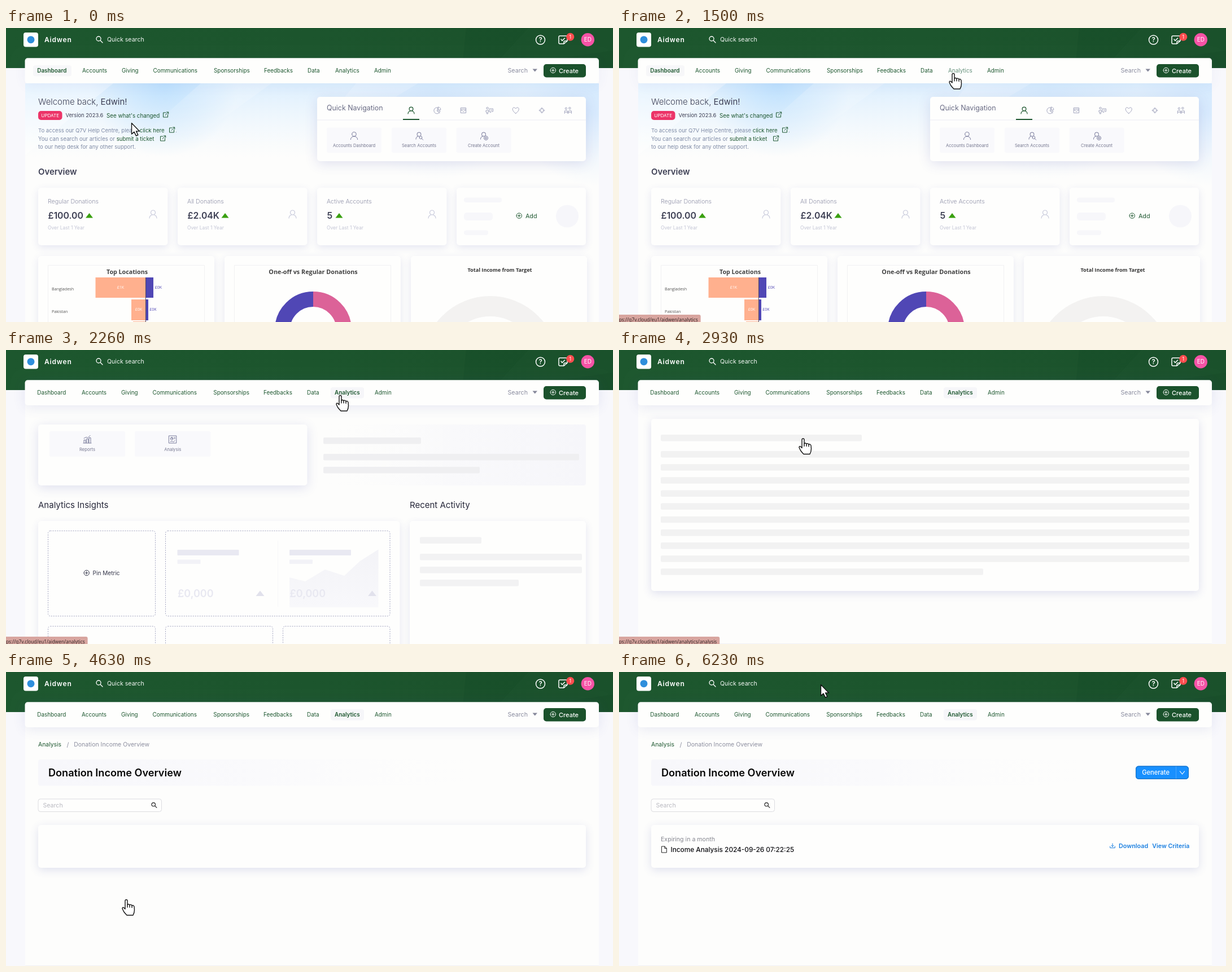
An HTML page with a canvas for the animation above (6.33 s loop, 1075 by 521 pixels).

```html
<!DOCTYPE html>
<html lang="en">
<head>
<meta charset="utf-8">
<title>Analytics walkthrough</title>
<style>
html, body { margin: 0; width: 100%; height: 100%; overflow: hidden; background: #f8f8fc; }
canvas { display: block; width: 1075px; height: 521px; }
</style>
</head>
<body>
<canvas id="stage"></canvas>
<script>
const W = 1075, H = 521, LOOP = 6330;
const canvas = document.getElementById('stage');
const ratio = window.devicePixelRatio || 1;
canvas.width = W * ratio;
canvas.height = H * ratio;
const c = canvas.getContext('2d');

const GREEN = '#1d572f', INK = '#3d3f54', MUTED = '#a3a6be', PANEL = '#fefefd', BLUE = '#1890ff';
const UI = 'Inter, sans-serif', CHART = '"Open Sans", sans-serif';
const TAU = Math.PI * 2;

// Text: y is the middle of the capitals. Returns the advance width.
function text(s, x, y, size, color, weight = 400, align = 'left', family = UI) {
  c.font = `${weight} ${size}px ${family}`;
  c.textAlign = align;
  c.fillStyle = color;
  c.fillText(s, x, y + size * 0.364);
  return c.measureText(s).width;
}
function box(x, y, x2, y2, color, r = 0) {
  c.beginPath();
  c.roundRect(x, y, x2 - x, y2 - y, r);
  c.fillStyle = color;
  c.fill();
}
function frame(x, y, x2, y2, color, r = 4, dash = []) {
  c.beginPath();
  c.roundRect(x + 0.5, y + 0.5, x2 - x - 1, y2 - y - 1, r);
  c.setLineDash(dash);
  c.strokeStyle = color;
  c.lineWidth = 1;
  c.stroke();
  c.setLineDash([]);
}
function card(x, y, x2, y2, blur = 14, alpha = 0.13, r = 5) {
  c.save();
  c.shadowColor = `rgba(70,80,170,${alpha})`;
  c.shadowBlur = blur * ratio;
  c.shadowOffsetY = 4 * ratio;
  box(x, y, x2, y2, PANEL, r);
  c.restore();
}
function disc(x, y, r, color) {
  c.beginPath();
  c.arc(x, y, r, 0, TAU);
  c.fillStyle = color;
  c.fill();
}
function poly(color, ...p) {
  c.beginPath();
  for (let i = 0; i < p.length; i += 2) c.lineTo(p[i], p[i + 1]);
  c.fillStyle = color;
  c.fill();
}
// Line icon from an SVG path, placed around its own origin.
function icon(d, x, y, color, width = 1, scale = 1) {
  c.save();
  c.translate(x, y);
  c.scale(scale, scale);
  c.strokeStyle = color;
  c.lineWidth = width / scale;
  c.lineCap = c.lineJoin = 'round';
  c.stroke(new Path2D(d));
  c.restore();
}
function gradient(x, y, x2, y2, ...colors) {
  const g = c.createLinearGradient(x, y, x2, y2);
  colors.forEach((k, i) => g.addColorStop(i / (colors.length - 1), k));
  return g;
}
function glow(x, y, r, rgb, alpha) {
  const g = c.createRadialGradient(x, y, 0, x, y, r);
  g.addColorStop(0, `rgba(${rgb},${alpha})`);
  g.addColorStop(1, `rgba(${rgb},0)`);
  box(34, 98, 1050, H, g);
}
function faded(alpha, draw) {
  if (alpha <= 0) return;
  c.save();
  c.globalAlpha = alpha;
  draw();
  c.restore();
}

const ICON = {
  person: 'M-4-3a4 4 0 1 0 8 0a4 4 0 1 0-8 0M-6.5 7C-6.5-1 6.5-1 6.5 7',
  pie: 'M1-5A5.5 5.5 0 1 0 5 1L0 1ZM2-6A5 5 0 0 1 6-1L2-1ZM0 1L4 5',
  inbox: 'M-4.5-4.5H4.5V4.5H-4.5ZM-4.5-2H4.5M-4.5 0H-2C-1 2.5 1 2.5 2 0H4.5',
  talk: 'M-5.5-4a1.7 1.7 0 1 0 3.4 0a1.7 1.7 0 1 0-3.4 0M-6 0H-2V3H-3V6H-5V3H-6ZM0-3H6V2H3L1 4V2H0ZM2-.5H4',
  heart: 'M0 5.5C-9-1-5-6-2.5-5Q-1-4.7 0-3Q1-4.7 2.5-5C5-6 9-1 0 5.5Z',
  target: 'M-3.5 0a3.5 3.5 0 1 0 7 0a3.5 3.5 0 1 0-7 0M0-5V-2M0 2V5M-5 0H-2M2 0H5',
  group: 'M-5-3.5a1.6 1.6 0 1 0 3.2 0a1.6 1.6 0 1 0-3.2 0M1.5-4a1.6 1.6 0 1 0 3.2 0a1.6 1.6 0 1 0-3.2 0M-6 5.5V1Q-3.5-2-1 1V5.5M1 5.5V1Q3-2 6 1V5.5M-6 3H6',
  lens: 'M-5-1.5a4 4 0 1 0 8 0a4 4 0 1 0-8 0M2 1.5L6 5.5',
  plus: 'M-4.7 0a4.7 4.7 0 1 0 9.4 0a4.7 4.7 0 1 0-9.4 0M-2.4 0H2.4M0-2.4V2.4',
  link: 'M0-3.5H-4.5V4.5H3.5V0M1.5-4.5H4.7V-1.3M4.5-4.3L-1 1',
  bars: 'M-6 6V1H-3V6M-1.5 6V-1H1.5V6M3 6V-3H6V6M-7 6.5H7M-6-2L-2-4L1-3L5-7',
  report: 'M-6.5-6.5H6.5V6.5H-6.5ZM-4-1.5a2.3 2.3 0 1 0 4.6 0a2.3 2.3 0 1 0-4.6 0M-1.7-3.7V-1.5H.5M2.5-3.5H4.5M2.5-1.5H4.5M-4 4L-1 3L1 4.5L4 2',
  note: 'M7-2V-5Q7-7 5-7H-6Q-8-7-8-5V5Q-8 7-6 7H1L7 2V-2M1 7V4Q1 2 3 2H7M-4-1L-2 1.5L2.5-3',
  file: 'M-4-5.5H1L4.5-2V5.5H-4ZM1-5.5V-2H4.5',
  download: 'M0-4V1.5M-2-.7L0 1.5L2-.7M-4.3 1V3.7H4.3V1',
  chevron: 'M-4-2.5L0 2.5L4-2.5'
};

// Menu entries: label, x before and after the active entry changes.
const NAV = [
  ['Dashboard', 55.3, 55.3], ['Accounts', 135, 134], ['Giving', 205, 204],
  ['Communications', 260.5, 259.5], ['Sponsorships', 368, 367.3], ['Feedbacks', 457, 456],
  ['Data', 534, 533], ['Analytics', 583, 582], ['Admin', 652, 653]
];

function shell() {
  box(0, 0, W, H, '#f8f8fc');
  box(0, 0, W, 71, gradient(0, 0, W, 0, '#1d572e', '#1c552d', '#1b512b'));
  poly('rgba(8,50,24,.1)', 815, 0, 1075, 0, 1075, 71, 808, 71);
  poly('rgba(60,120,75,.07)', 925, 0, 1075, 0, 1075, 40, 860, 71);
  box(34, 71, 1050, H, '#fdfdfc');

  box(31, 8, 57, 33.5, '#fff', 4);
  disc(44, 20.7, 6.5, '#2f8fdc');
  c.letterSpacing = '0.8px';
  text('Aidwen', 68, 20.5, 12, '#fff', 600);
  c.letterSpacing = '0px';
  icon(ICON.lens, 165, 20.5, '#fff', 1.3);
  text('Quick search', 179, 20.5, 10.6, '#f4f8f5');
  c.beginPath();
  c.arc(946.5, 21, 8, 0, TAU);
  c.strokeStyle = '#fff';
  c.lineWidth = 1.5;
  c.stroke();
  text('?', 946.5, 21, 11.5, '#fff', 600, 'center');
  icon(ICON.note, 987, 21, '#fff', 1.5);
  disc(999.3, 15.8, 7, '#ff4d4f');
  text('1', 999.3, 15.8, 8.5, '#fff', 400, 'center');
  disc(1030.3, 20.8, 11.7, '#f653a6');
  text('ED', 1030.3, 20.8, 10, '#fff', 400, 'center');
}

function navBar(t) {
  card(33.5, 53.3, 1050, 98, 22, t < 1730 ? 0.06 : 0.12, 5);
  const late = t >= 1860, active = late ? 'Analytics' : 'Dashboard';
  if (late) box(575, 66, 634, 85.5, '#f6f6f9', 4);
  else box(48, 66, 116, 85.5, t < 1730 ? '#f7f7f9' : '#fbfbfc', 4);
  for (const [label, early, moved] of NAV) {
    const hover = label === 'Analytics' && t >= 1130 && !late;
    text(label, late ? moved : early, 75.6, 9.9, hover ? '#64907a' : GREEN, label === active ? 600 : 400);
  }
  text('Search', 888.5, 75.5, 10.7, '#8a8c9f');
  poly('#85879a', 932.5, 72.5, 941, 72.5, 936.7, 77.5);
  box(952, 64, 1027, 87.5, '#1b522c', 5);
  icon(ICON.plus, 968.8, 75, '#fff');
  text('Create', 979, 75.5, 11, '#fff', 500);
}

function tile(x, y, x2, y2, label, shape, scale = 1) {
  box(x, y, x2, y2, '#f9f9fc', 3);
  icon(ICON[shape], (x + x2) / 2, y + 14.5, '#7a7c9c', 1, scale);
  text(label, (x + x2) / 2, y + 32, 7.6, '#75778f', 400, 'center');
}

function hero() {
  box(34, 98, 1050, 230, gradient(0, 98, 0, 230, 'rgba(208,233,254,.75)', 'rgba(230,243,255,0)'));
  glow(280, 98, 130, '150,206,253', 0.45);
  glow(760, 110, 160, '195,225,254', 0.35);
  glow(1040, 150, 130, '195,223,254', 0.5);
  poly(gradient(0, 98, 0, 200, 'rgba(255,255,255,.22)', 'rgba(255,255,255,0)'), 345, 98, 470, 98, 330, 200, 230, 200);
  poly('rgba(255,255,255,.18)', 620, 98, 730, 98, 690, 122, 600, 122);
  poly('rgba(255,255,255,.3)', 34, 98, 190, 98, 34, 225);
}

function stat(x, title, value, arrow) {
  card(x, 283, x + 229.5, 385);
  text(title, x + 17, 307.5, 10.6, '#8f91a8', 300);
  text(value, x + 17.5, 332.5, 15.8, INK, 600);
  poly('#3aa010', x + arrow - 6.5, 336.5, x + arrow, 328, x + arrow + 6.5, 336.5);
  text('Over Last 1 Year', x + 17, 353.5, 8.5, '#c3c5d5');
  icon(ICON.person, x + 203.5, 330, '#c9cbdc', 1.2);
}

function charts() {
  for (const x of [57, 387, 717]) card(x, 404, x + 312, 540);
  frame(74, 420, 352, 540, '#f1f1f3', 0);
  frame(404, 420, 682, 540, '#f1f1f3', 0);
  const purple = '#5047b5', peach = '#ffb08e';
  text('Top Locations', 214.5, 432, 10.7, '#414141', 700, 'center', CHART);
  text('Bangladesh', 81, 462.5, 7.2, '#555', 400, 'left', CHART);
  text('Pakistan', 81, 502.5, 7.2, '#555', 400, 'left', CHART);
  box(158.5, 442, 247, 478, peach);
  box(248, 442, 261, 478, purple);
  box(222, 481, 247, 518, peach);
  box(248, 481, 252, 518, purple);
  box(225, 520, 247, 521, peach);
  box(247, 442, 248, 521, '#4b4360');
  text('£1K', 203, 459.5, 7, '#fff', 400, 'center', CHART);
  text('£0K', 270, 459.5, 7, purple, 400, 'center', CHART);
  text('£0K', 235, 498.5, 7, '#fff', 400, 'center', CHART);
  text('£0K', 260.5, 498.5, 7, purple, 400, 'center', CHART);

  text('One-off vs Regular Donations', 544, 432, 10.8, '#414141', 700, 'center', CHART);
  const arc = (x, y, r, width, a, b, color) => {
    c.beginPath();
    c.arc(x, y, r, a, b);
    c.strokeStyle = color;
    c.lineWidth = width;
    c.stroke();
  };
  arc(544, 535, 54.5, 27, Math.PI * 0.5, Math.PI * 1.5, purple);
  arc(544, 535, 54.5, 27, -Math.PI / 2, Math.PI / 2, '#dc6298');
  text('Total Income from Target', 874.5, 429, 9.15, '#333', 700, 'center', CHART);
  arc(857.5, 595, 102, 36, Math.PI, TAU, '#f3f2f1');
}

function dashboard() {
  hero();
  const hi = text('Welcome back, ', 57, 131, 14.9, INK, 300);
  text('Edwin!', 57 + hi, 131, 14.9, INK);
  box(57, 147, 99.5, 163, '#ec3468', 5);
  text('UPDATE', 78.2, 155.2, 8.2, '#fff', 400, 'center');
  text('Version 2023.6', 105.5, 155, 9.3, INK);
  text("See what's changed", 178, 155, 9.8, GREEN);
  icon(ICON.link, 283, 153.5, GREEN);
  const grey = '#7f8ba6';
  let x = 57 + text('To access our Q7V Help Centre, please ', 57, 181.5, 9.55, grey);
  text('click here', x, 181.5, 9.6, GREEN);
  icon(ICON.link, 294, 180.5, GREEN);
  text('.', 300, 181.5, 9.5, grey);
  x = 57 + text('You can search our articles or ', 57, 196.7, 9.65, grey);
  text('submit a ticket', x, 196.7, 9.7, GREEN);
  icon(ICON.link, 278, 195.5, GREEN);
  text('to our help desk for any other support.', 57, 211, 9.5, grey);

  card(551, 122, 1027, 236, 22, 0.17);
  text('Quick Navigation', 568, 141.5, 12.4, '#696b84');
  box(551, 162.5, 1027, 163.5, '#eeeef3');
  box(703, 161, 732, 163, GREEN);
  ['person', 'pie', 'inbox', 'talk', 'heart', 'target', 'group'].forEach((name, i) =>
    icon(ICON[name], 717.5 + i * 46.3, 146, i ? MUTED : GREEN, i ? 1 : 1.2, i ? 1 : 0.85));
  tile(568, 176.5, 665, 221, 'Accounts Dashboard', 'person', 0.95);
  tile(683, 176.5, 780, 221, 'Search Accounts', 'person', 0.85);
  tile(797.5, 176.5, 894.5, 221, 'Create Account', 'person', 0.85);
  disc(735, 195, 4, '#f9f9fc');
  icon(ICON.lens, 735, 195, '#7a7c9c', 1, 0.6);
  disc(850, 195, 4, '#f9f9fc');
  icon(ICON.plus, 850, 195, '#7a7c9c', 1, 0.75);

  text('Overview', 57, 255, 14.9, INK, 600);
  stat(57, 'Regular Donations', '£100.00', 90.5);
  stat(304, 'All Donations', '£2.04K', 84);
  stat(551, 'Active Accounts', '5', 39);
  card(798, 283, 1027, 385);
  box(811, 300.5, 878, 309, '#f7f7fa', 4);
  box(811, 327, 862, 341, '#f7f7fa', 5);
  box(811, 358.5, 854, 367, '#f7f7fa', 4);
  disc(994, 333.5, 20, '#f6f6fa');
  icon(ICON.plus, 908.7, 332.7, GREEN);
  text('Add', 920, 333, 10.7, GREEN);
  charts();
}

function bars(color, rows) {
  for (const [x, x2, y] of rows) box(x, y, x2, y + 11.5, color, 2);
}

function metric(x) {
  box(x, 354, x + 109, 364, '#e9e9f2', 1);
  box(x, 371.5, x + 41, 379, '#f2f2f7', 1);
  text('£0,000', x + 0.5, 431, 18, '#e8e8f1', 600);
  poly('#e1e1ec', x + 139, 436, x + 146.5, 426.5, x + 154, 436);
}

function analytics() {
  card(57, 132, 533.5, 240, 20, 0.17);
  tile(77, 144, 211, 189, 'Reports', 'bars');
  tile(228, 144, 362.5, 189, 'Analysis', 'report');
  box(551, 132, 1027, 240, gradient(551, 0, 1027, 0, 'rgba(253,253,252,0)', '#f9f9fb', '#f6f6fa'), 4);
  bars('#efeff1', [[562, 735, 155], [562, 1015, 184], [562, 839, 207]]);
  text('Analytics Insights', 57, 275, 15, '#26273a');
  text('Recent Activity', 715, 275, 15, '#26273a');

  card(57, 303, 697.5, 540);
  card(715, 303, 1027, 540);
  bars('#f2f2f3', [[733, 842, 331.5], [733, 1020, 361], [733, 1020, 384], [733, 908, 407]]);
  const edge = '#a2a4c0', dash = [2, 2];
  frame(74, 320, 265, 472, edge, 4, dash);
  frame(282, 320, 680.5, 472, edge, 4, dash);
  for (const [x, x2] of [[74, 265], [282, 473], [490, 680.5]]) frame(x, 489, x2, 540, edge, 4, dash);
  icon(ICON.plus, 142.7, 395, '#34364a');
  text('Pin Metric', 153.5, 395.5, 10.1, '#34364a');
  box(481, 338, 482, 455, '#f6f6f9');
  poly(gradient(0, 354, 0, 456, '#f3f3f7', '#f8f8fb'),
    502, 403, 530, 410, 565, 389, 599, 400, 627, 374, 659.5, 353.5, 659.5, 456, 502, 456);
  metric(303.5);
  metric(502);
}

function pageEnd() {
  box(34, 520, 1050, 521, '#f1f1f5');
}

function skeleton() {
  card(57, 122, 1027, 427, 16, 0.17);
  const rows = [[74, 430, 150]];
  for (let i = 0; i < 9; i++) rows.push([74, 1010, 179 + i * 23.15]);
  rows.push([74, 645, 387.3]);
  bars('#f2f2f2', rows);
  pageEnd();
}

function heading(parent, slash, name, title) {
  text(parent, 57, 128.5, 10.4, GREEN);
  text('/', slash, 128.5, 11, '#8c8e9f');
  text(name, slash + 12.7, 128.5, 10.5, '#8c8e9f');
  box(57, 155, 860, 201.5, gradient(57, 0, 860, 0, '#f7f7fb', '#fafafc', 'rgba(253,253,252,0)'), 4);
  text(title, 75, 178.3, 18.1, '#050505', 600);
  pageEnd();
}

function analysis(t) {
  heading('Analytics', 112, 'Analysis', 'Analysis');
  card(57, 225, 1027, 458.5, 20, 0.17);
  box(57, 225, 1027, 265, '#fafafd', [5, 5, 0, 0]);
  text('Giving', 74, 245, 12, '#24252f', 500);
  card(73, 281, 296, 442, 16, t >= 3780 ? 0.16 : 0.04);
  frame(73, 281, 296, 442, '#85879c', 4, [2, 1.4]);
  box(91.5, 291, 278, 432, '#fbfbfc');
  for (const [x, y, r] of [[254, 322, 6], [216.5, 348.5, 8], [155.5, 360, 5.7], [126, 391, 17], [192, 373, 8], [237, 381, 12]])
    disc(x, y, r, '#ededee');
  text('Donation Income', 184.7, 312.5, 15.2, GREEN, 600, 'center');
  text('Overview', 184.7, 332.5, 15.2, GREEN, 600, 'center');
  box(91.5, 349.5, 278, 350.5, '#e6e6e9');
  ['Provides insights to the amount,', 'source and characteristics of',
    'donation income raised from single', 'and regular donations.'].forEach((line, i) =>
    text(line, 91.5, 365.5 + i * 15.75, 10.4, '#2f303a'));
}

function results(t) {
  heading('Analysis', 107.5, 'Donation Income Overview', 'Donation Income Overview');
  box(57, 225, 276, 248, PANEL, 4);
  frame(56.5, 224.5, 276, 248, '#dcdce0');
  text('Search', 65.5, 236, 10.6, '#b9b9c0');
  icon(ICON.lens, 262, 236, '#222', 1.2, 0.8);
  card(57, 271, 1027, 347, 16, 0.16);
  faded(Math.min(1, (t - 4880) / 240), () => {
    box(915, 166.5, 1009, 190, BLUE, 5);
    frame(915, 166.5, 1009, 190, '#1568b8', 5);
    box(986, 167.5, 987, 189, '#4ba7fb');
    text('Generate', 926.3, 178, 11.1, '#fff', 500);
    icon(ICON.chevron, 997.5, 178.5, '#fff', 1.2);
    text('Expiring in a month', 74, 296, 10.6, '#85868f');
    icon(ICON.file, 79.8, 314.5, '#222');
    text('Income Analysis 2024-09-26 07:22:25', 91.5, 315, 11.8, '#101014', 500);
    icon(ICON.download, 874, 308, '#1a7fe0');
    text('Download', 885, 308.2, 10.75, '#1a7fe0', 600);
    text('View Criteria', 944.3, 308.2, 10.6, '#1a7fe0', 600);
  });
}

// Link previews: path, fade-in start and end, fade-out start and end.
const PREVIEWS = [
  ['analytics', 1160, 1260, 2640, 2641],
  ['analytics/analysis', 2640, 2641, 3260, 3400],
  ['analytics/analysis/donation-income', 3950, 4050, 4230, 4400]
];
function preview(t) {
  for (const [path, a, b, d, e] of PREVIEWS) {
    const alpha = Math.min(1, (t - a) / (b - a), (e - t) / (e - d));
    faded(alpha, () => {
      const label = 'ps://q7v.cloud/eu1/aidwen/' + path;
      c.font = `400 8.3px ${CHART}`;
      box(0, 508, c.measureText(label).width + 5, H, '#d8a59f', [0, 3, 0, 0]);
      text(label, 0, 516.6, 8.3, '#2b2020', 400, 'left', CHART);
    });
  }
}

const ARROW = new Path2D('M0 0V19.5L4.5 15.6L8 22.6L11.3 21L8 14.4H14Z');
const HAND = new Path2D('M-2 2Q-2 0 0 0Q2 0 2 2V9Q4 6.8 6 9.2Q8.2 7.6 10 10.3Q12.6 9 14 12.2L14.5 18Q14.4 23 12 27.5H1Q-2 24.5-4.5 21L-7 15.8Q-7 12.8-4.2 14.2L-2 16.5Z');
const CREASES = new Path2D('M2 9V14M6 9.2V14M10 10.3V14.5');

// Pointer moves: start, end, from, to.
const MOVES = [
  [400, 860, 222.5, 168.5, 558.5, 100],
  [860, 1030, 558.5, 100, 574, 93],
  [1060, 1240, 574, 93, 592, 80.5],
  [2400, 2760, 592, 80.5, 326, 157],
  [3660, 3800, 326, 157, 213, 403.5],
  [5930, 6230, 213, 403.5, 357.5, 22.5]
];
const ease = p => p < 0.5 ? 4 * p ** 3 : 1 - 4 * (1 - p) ** 3;

function pointer(t) {
  let [, , x, y] = MOVES[0];
  for (const [a, b, x0, y0, x1, y1] of MOVES) {
    if (t < a) break;
    const p = ease(Math.min(1, (t - a) / (b - a)));
    x = x0 + (x1 - x0) * p;
    y = y0 + (y1 - y0) * p;
  }
  const hand = (t >= 1130 && t < 2460) || (t >= 2620 && t < 3690) || (t >= 3770 && t < 5930);
  c.save();
  c.translate(x, y);
  c.fillStyle = '#fff';
  c.strokeStyle = '#111';
  c.lineWidth = 1.4;
  c.lineJoin = 'round';
  const shape = hand ? HAND : ARROW;
  c.fill(shape);
  c.stroke(shape);
  if (hand) c.stroke(CREASES);
  c.restore();
}

const SCENES = [[4560, results], [4230, skeleton], [2960, analysis], [2930, skeleton], [1730, analytics]];

function render(t) {
  c.setTransform(ratio, 0, 0, ratio, 0, 0);
  shell();
  if (t < 1730) {
    dashboard();
    navBar(t);
  } else {
    navBar(t);
    SCENES.find(([start]) => t >= start)[1](t);
  }
  preview(t);
  pointer(t);
}

let began;
function tick(now) {
  began ??= now;
  render((now - began) % LOOP);
  requestAnimationFrame(tick);
}
requestAnimationFrame(tick);
</script>
</body>
</html>
```
